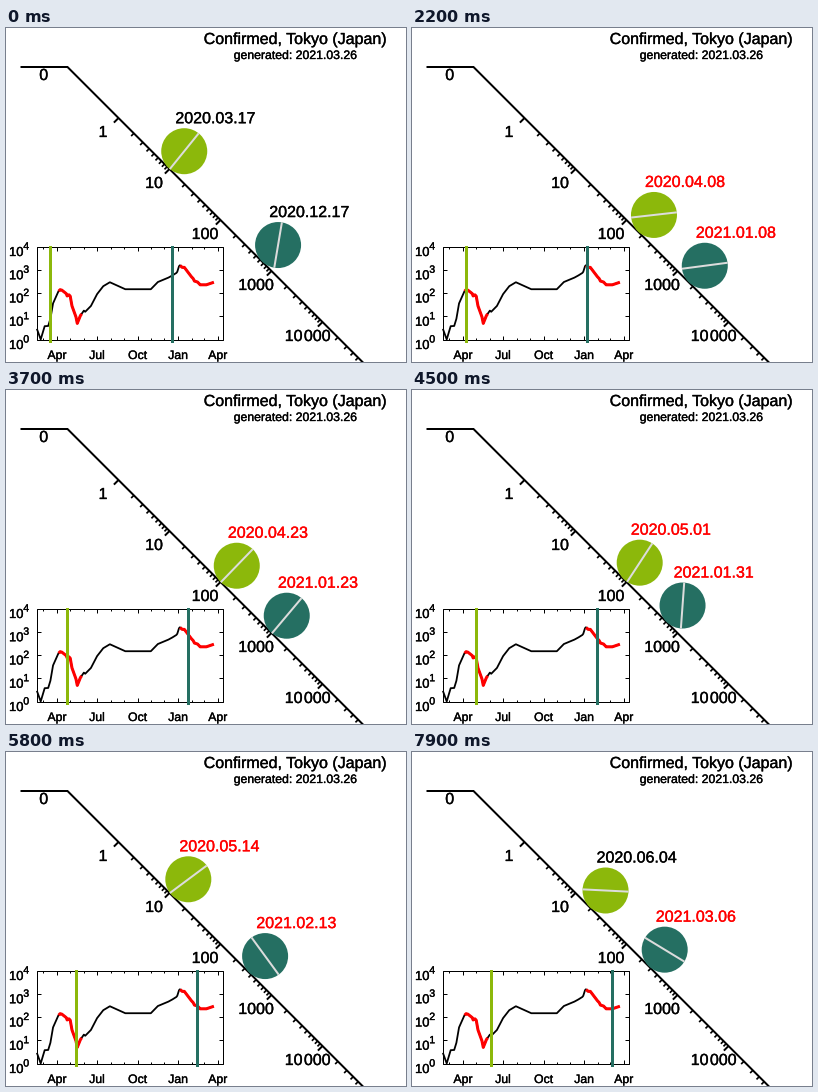
Recreate the animation shown at these times as a matplotlib script. Size 400 px wide and 334 px high, loop 8000 ms.

```python
import numpy as np
import matplotlib.pyplot as plt
from matplotlib.animation import FuncAnimation
from matplotlib.patches import Circle, Rectangle
from matplotlib.patheffects import Normal, Stroke

W, H, DPI = 400, 334, 100
PT = 72 / DPI                      # points per pixel
GREEN, TEAL = "#8cb80b", "#256f62"
START = np.datetime64("2020-03-17")
LAG = 275                          # days between the two balls
R = 23                             # ball radius
X0, Y0, DEC = 61.5, 39, 51         # start of the slope, pixels per decade
ALERTS = [(21, 69), (297, 368)]    # days drawn in red

# turning points of the weekly mean: day, log10 of the count
KEYS = np.array([
    (-30, .5), (-22, .08), (-13, .65), (-5, .66),
    (0, .97), (6, 1.63), (18, 2.14), (22, 2.22), (26, 2.2), (36, 2.05),
    (38, 1.95), (42, 2), (45, 1.94), (49, 1.52), (58, 1.05), (61, .77),
    (68, 1.1), (76, 1.32), (79, 1.27),
    (92, 1.52), (106, 2.03), (120, 2.37), (135, 2.54), (170, 2.24),
    (228, 2.24), (244, 2.55), (266, 2.72),
    (275, 2.81), (286, 2.94), (288, 2.99), (292, 3.23), (294, 3.27),
    (299, 3.18), (304, 3.18), (320, 2.78), (324, 2.7), (327, 2.59),
    (334, 2.55), (340, 2.43), (354, 2.43), (368, 2.52)])


def level(day):
    return np.interp(day, *KEYS.T)


plt.rcParams["font.family"] = "Liberation Sans"
fig = plt.figure(figsize=(W / DPI, H / DPI), dpi=DPI, facecolor="white")
ax = fig.add_axes([0, 0, 1, 1])
ax.set_xlim(0, W)
ax.set_ylim(H, 0)
ax.axis("off")


def line(xs, ys, width, color="black", **kw):
    return ax.plot(xs, ys, color=color, lw=width * PT, **kw)[0]


def label(x, y, s, size=16, ha="center", **kw):
    # a hairline outline gives the type a slightly heavier weight
    return ax.text(x, y, s, fontsize=size * PT, ha=ha, va="baseline",
                   path_effects=[Stroke(linewidth=.35 * PT), Normal()], **kw)


def is_alert(day):
    return any(a <= day <= b for a, b in ALERTS)


def draw_slope():
    line([15.5, X0, X0 + 300], [Y0, Y0, Y0 + 300], 2,
         solid_joinstyle="miter", zorder=2)
    for k in range(5):
        for m in range(1, 10):
            s = DEC * (k + 1 + np.log10(m))
            n = 4.6 if m == 1 else 2.7
            line([X0 + s, X0 + s - n], [Y0 + s, Y0 + s + n],
                 2 if m == 1 else 1.7, solid_capstyle="butt", zorder=2)
    label(37.7, 52, "0")
    for k in range(4):
        label(97 + DEC * k, 109 + DEC * k, str(10 ** k))
    label(296.5, 313, "10", ha="right")
    label(297.9, 313, "000", ha="left")


LEFT, RIGHT, TOP, BOTTOM = 30.5, 216.5, 218.5, 311.5
STEP = (BOTTOM - TOP) / 4


def chart_x(day):
    return 44.4 + .4405 * day


def draw_chart():
    ax.add_patch(Rectangle((LEFT, TOP), RIGHT - LEFT, BOTTOM - TOP,
                           fill=False, lw=PT, zorder=3))
    for k in range(5):
        y = BOTTOM - k * STEP
        for x, n in ((LEFT, 4), (RIGHT, -4)):
            line([x, x + n], [y, y], 1, solid_capstyle="butt")
        label(3, y + 9.5, "10", 13, "left")
        label(17.3, y + 3, str(k), 10.5, "left")
    names = {0: "Jan", 3: "Apr", 6: "Jul", 9: "Oct"}
    for m in np.arange("2020-03", "2021-05", dtype="datetime64[M]"):
        x = chart_x((m.astype("datetime64[D]") - START).astype(int))
        name = names.get(m.astype(int) % 12)
        n = 4 if name else 2
        for y, dy in ((TOP, n), (BOTTOM, -n)):
            line([x, x], [y, y + dy], 1, solid_capstyle="butt")
        if name:
            label(x, 331, name, 12.25)
    for a, b, width, color in [(-30, 368, 1.8, "black"),
                               *((a, b, 3, "red") for a, b in ALERTS)]:
        days = np.arange(a, b + 1)
        line(chart_x(days), BOTTOM + 1.8 - STEP * level(days), width, color,
             zorder=4)


class Ball:
    def __init__(self, color, lag):
        self.lag = lag
        self.disc = ax.add_patch(Circle((0, 0), R, fc=color, lw=0, zorder=3))
        self.mark = line([], [], 2, "#dcdcdc", solid_capstyle="butt",
                         zorder=4)
        self.date = label(0, 0, "", zorder=6)
        self.bar = line([], [], 3, color, zorder=5)

    def move(self, step):
        day = step + self.lag
        run = DEC * (1 + level(day))
        lift = R / np.sqrt(2)
        x, y = X0 + run + lift, Y0 + run - lift
        self.disc.center = x, y
        # rolling without slipping
        turn = np.pi / 4 - run * np.sqrt(2) / R
        dx, dy = R * np.cos(turn), R * np.sin(turn)
        self.mark.set_data([x - dx, x + dx], [y + dy, y - dy])
        self.date.set_position((x + 31, y - 28))
        self.date.set_text(str(START + day).replace("-", "."))
        self.date.set_color("red" if is_alert(day) else "black")
        bx = chart_x(day)
        self.bar.set_data([bx, bx], [TOP, BOTTOM + 1.5])
        return [self.disc, self.mark, self.date, self.bar]


label(289.2, 16, "Confirmed, Tokyo (Japan)")
label(289.2, 31, "generated: 2021.03.26", 12.25)
draw_slope()
draw_chart()
balls = [Ball(GREEN, 0), Ball(TEAL, LAG)]


def update(step):
    return [artist for ball in balls for artist in ball.move(step)]


anim = FuncAnimation(fig, update, frames=80, interval=100, repeat=True,
                     repeat_delay=0, blit=False)
plt.show()
```
